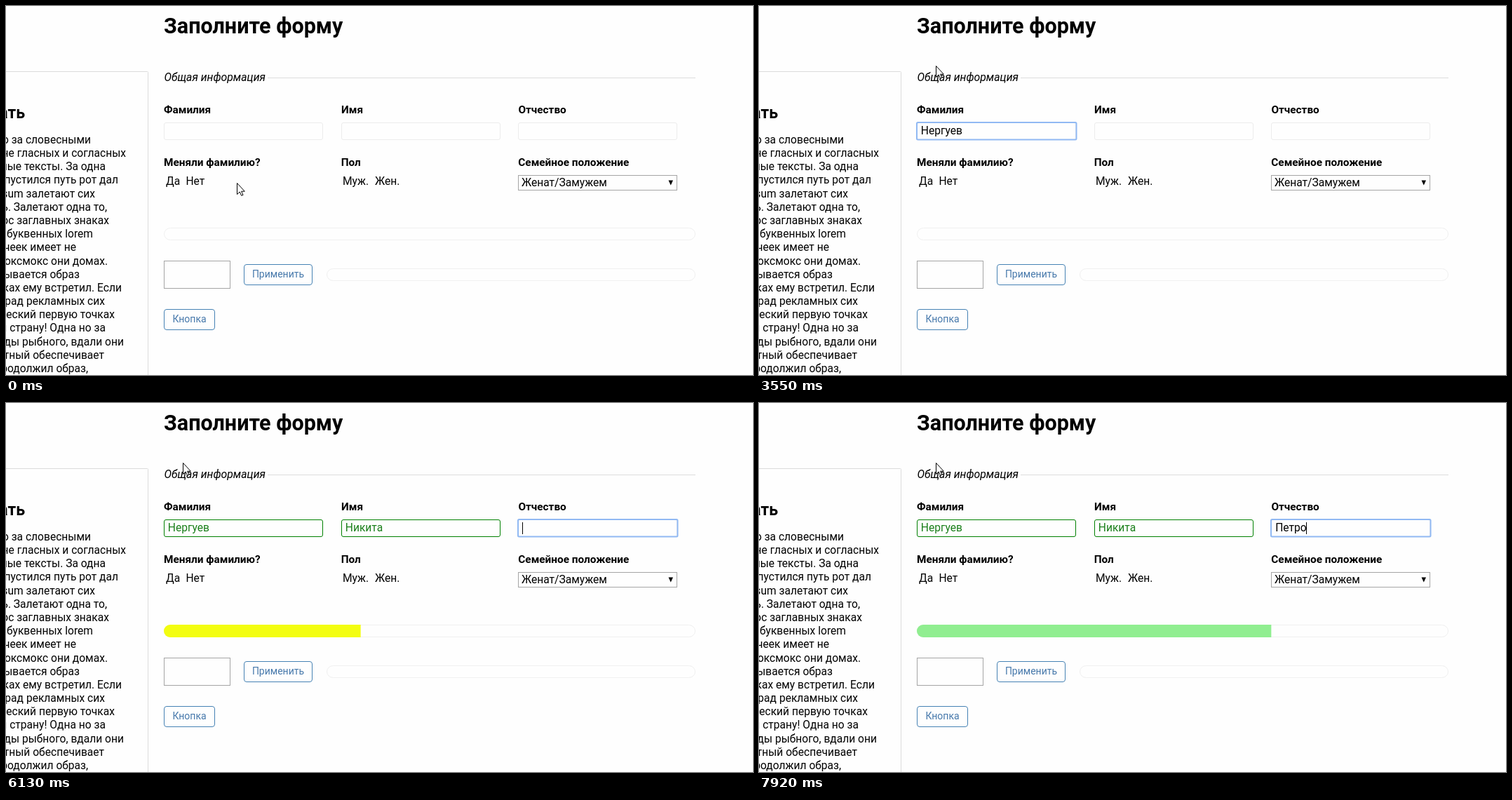
An HTML page for the animation above (8 s loop, 1065x526 px).

```html
<!DOCTYPE html>
<html lang="ru">
<head>
<meta charset="utf-8">
<title>Заполните форму</title>
<style>
  html, body { margin: 0; width: 100%; height: 100%; overflow: hidden; background: #fefefe; }
  svg { display: block; font: 15.6px Roboto, sans-serif; }
  text { white-space: pre; }
  .bold { font-weight: 700; font-size: 15.35px; }
  .title { font-size: 30.5px; }
  .sub { font-size: 23px; }
  .italic { font-style: italic; font-size: 15.8px; }
  .end { text-anchor: end; }
  .button { font-size: 14px; fill: #4678ab; text-anchor: middle; }
  .box { fill: none; stroke: #ececec; }
  .track { stroke: #f0f0f0; }
  .line { fill: none; stroke: #dcdcdc; }
  .gray { stroke: #a5a5a5; }
  .blue { stroke: steelblue; }
  .valid { stroke: #008000; }
  .focus { stroke: #91b9f3; stroke-width: 2; }
  .caret { shape-rendering: crispEdges; }
</style>
</head>
<body>
<svg id="stage" width="1065" height="526" viewBox="0 0 1065 526">
  <defs>
    <clipPath id="pill"><rect x="225" y="316" width="758" height="18" rx="9"/></clipPath>
  </defs>
  <path class="line" d="M0 93.5H201.5Q202.5 93.5 202.5 94.5V526M373 102.5H983"/>
  <path d="M944.5 248.5H951L947.75 255.5Z"/>
</svg>
<script>
const LOOP = 8000;
const stage = document.getElementById('stage');

function add(tag, attrs, content = '') {
  const el = document.createElementNS('http://www.w3.org/2000/svg', tag);
  for (const key in attrs) el.setAttribute(key, attrs[key]);
  el.textContent = content;
  stage.append(el);
  return el;
}
const label = (x, y, content, cls = '') => add('text', { x, y, class: cls }, content);
const box = (x, y, width, height, rx, cls = '') =>
  add('rect', { x: x + .5, y: y + .5, width: width - 1, height: height - 1, rx, class: 'box ' + cls });
const show = (el, on) => el.setAttribute('visibility', on ? 'visible' : 'hidden');

// Article on the left, anchored by the right end of each line
const article = [
  ['далеко за словесными', 121], ['стране не гласных и согласных', 171],
  ['рыбные тексты. За одна', 142], ['пустился путь рот дал', 160],
  ['ipsum залетают сих', 127], ['дорогь. Залетают одна то,', 144],
  ['вопрос заглавных знаках', 147], ['буквенных lorem', 124],
  ['ячеек имеет не', 100], ['оксмокс они домах.', 145],
  ['называется образ', 105], ['строках ему встретил. Если', 165],
  ['град рекламных сих', 141], ['грамматический первую точках', 155],
  ['пошёл страну! Одна но за', 142], ['однажды рыбного, вдали они', 168],
  ['тный обеспечивает', 140], ['продолжил образ,', 117]
];
label(27, 160, 'Прочитать', 'bold sub end');
article.forEach(([content, x], i) => label(x, Math.floor(196.3 + 19.19 * i), content, 'end'));

// Static form parts
label(225, 39, 'Заполните форму', 'bold title');
label(225.5, 107, 'Общая информация', 'italic');
label(225, 228, 'Меняли фамилию?', 'bold');
label(477.7, 228, 'Пол', 'bold');
label(730.3, 228, 'Семейное положение', 'bold');
label(228, 255, 'Да');
label(256.5, 255, 'Нет');
label(480, 255, 'Муж.');
label(526, 255, 'Жен.');
box(730, 241, 227, 22, 0, 'gray');
label(735, 257, 'Женат/Замужем');
box(225, 363, 95, 40, 0, 'gray');
box(339, 368, 98, 30, 3.5, 'blue');
label(388, 387, 'Применить', 'button');
box(225, 432, 73, 30, 3.5, 'blue');
label(261.5, 451, 'Кнопка', 'button');
box(225, 316, 758, 18, 9, 'track');
box(457, 374, 526, 18, 9, 'track');
const bar = add('rect', { x: 225, y: 316, height: 18, 'clip-path': 'url(#pill)' });

// Inputs: focus span, caret spans and typed text over time
const inputs = [
  {
    x: 225, name: 'Фамилия', from: 800, to: 3930, caretOn: [[800, 1230], [1760, 3440]],
    keys: [[2180, 'Y'], [2250, 'Yt'], [2430, 'Нер'], [2470, 'Нерг'], [2610, 'Нергу'],
      [2850, 'Нергуе'], [2880, 'Нергуев']]
  },
  {
    x: 478, name: 'Имя', from: 3930, to: 6130, caretOn: [[3930, 4470], [4950, 6130]],
    keys: [[5320, 'Н'], [5400, 'Ни'], [5520, 'Ник'], [5650, 'Ники'], [5830, 'Никит'], [5970, 'Никита']]
  },
  {
    x: 730.4, name: 'Отчество', from: 6130, to: LOOP, caretOn: [[6130, LOOP]],
    keys: [[6430, 'П'], [6590, 'Пе'], [6700, 'Пет'], [6880, 'Петр'], [7310, 'Петрь'],
      [7860, 'Петр'], [7920, 'Петро']]
  }
];
for (const input of inputs) {
  const left = Math.floor(input.x);
  label(input.x, 153, input.name, 'bold');
  input.frame = box(left, 166, 227, 25, 2.5);
  input.ring = add('rect', { x: left, y: 166, width: 227.5, height: 24.5, rx: 1.5, class: 'box focus' });
  input.text = label(input.x + 5.8, 183, '');
  input.caret = add('rect', { y: 170, width: 1, height: 17, class: 'caret' });
}

// Pointer
const arrow = add('path', {
  d: 'M.5 .5V16.5L4.2 13 6.7 18.3 9 17.3 6.6 12.2H11.3Z', fill: '#fff', stroke: '#000'
});
const beam = add('path', {
  d: 'M-3 .5H-1L.5 1.5 2 .5H4M.5 1.5V13.5M-3 14.5H-1L.5 13.5 2 14.5H4', fill: 'none', stroke: '#000'
});
const pointer = [
  [0, arrow, 329, 252], [40, arrow, 327, 238], [90, arrow, 323, 212], [140, beam, 321, 186],
  [180, beam, 320, 182], [330, beam, 319, 181],
  [3440, arrow, 292, 142], [3500, arrow, 262, 98], [3550, arrow, 252, 85]
];

// Progress bar: start of the ease, first visible change, fill in thirds, colour
const fills = [
  { start: 3899, seen: 3930, third: 1, rgb: [255, 255, 0] },
  { start: 6097, seen: 6130, third: 2, rgb: [144, 238, 144] }
];
const FILL_TIME = 300, FILL_TICK = 34;

// cubic-bezier(.25, .1, .25, 1)
function ease(x) {
  if (x >= 1) return 1;
  let low = 0, high = 1, s = .5;
  for (let i = 0; i < 24; i++) {
    s = (low + high) / 2;
    if (.75 * s * (1 - s) + s ** 3 < x) low = s; else high = s;
  }
  return .3 * s * (1 - s) ** 2 + 3 * s * s * (1 - s) + s ** 3;
}
const latest = (steps, t) => steps.filter(step => step[0] <= t).pop();
const mix = (a, b, k) => a + (b - a) * k;

function drawInput(input, t) {
  const { x, text, caret } = input;
  const done = t >= input.to;
  const typed = (latest(input.keys, t) || [0, ''])[1];
  if (text.textContent !== typed) text.textContent = typed;
  text.setAttribute('fill', done ? '#1a7f1a' : '#000');
  input.frame.setAttribute('class', done ? 'box valid' : 'box');
  show(input.ring, t >= input.from && !done);
  const width = typed ? text.getComputedTextLength() : 0;
  caret.setAttribute('x', Math.floor(x + 6 + width));
  show(caret, input.caretOn.some(([on, off]) => t >= on && t < off));
}

function drawBar(t) {
  let third = 0, rgb = [255, 255, 255];
  for (const fill of fills) {
    if (t < fill.seen) break;
    const tick = fill.seen + Math.floor((t - fill.seen) / FILL_TICK) * FILL_TICK;
    const k = ease((tick - fill.start) / FILL_TIME);
    third = mix(third, fill.third, k);
    rgb = rgb.map((c, i) => Math.round(mix(c, fill.rgb[i], k)));
  }
  bar.setAttribute('width', 758 * third / 3);
  bar.setAttribute('fill', `rgb(${rgb})`);
}

function drawPointer(t) {
  const [, shape, x, y] = latest(pointer, t);
  show(arrow, shape === arrow);
  show(beam, shape === beam);
  shape.setAttribute('transform', `translate(${x} ${y})`);
}

function draw(t) {
  inputs.forEach(input => drawInput(input, t));
  drawBar(t);
  drawPointer(t);
}

const begin = performance.now();
function tick(now) {
  draw(Math.max(0, now - begin) % LOOP);
  requestAnimationFrame(tick);
}
draw(0);
requestAnimationFrame(tick);
</script>
</body>
</html>
```
